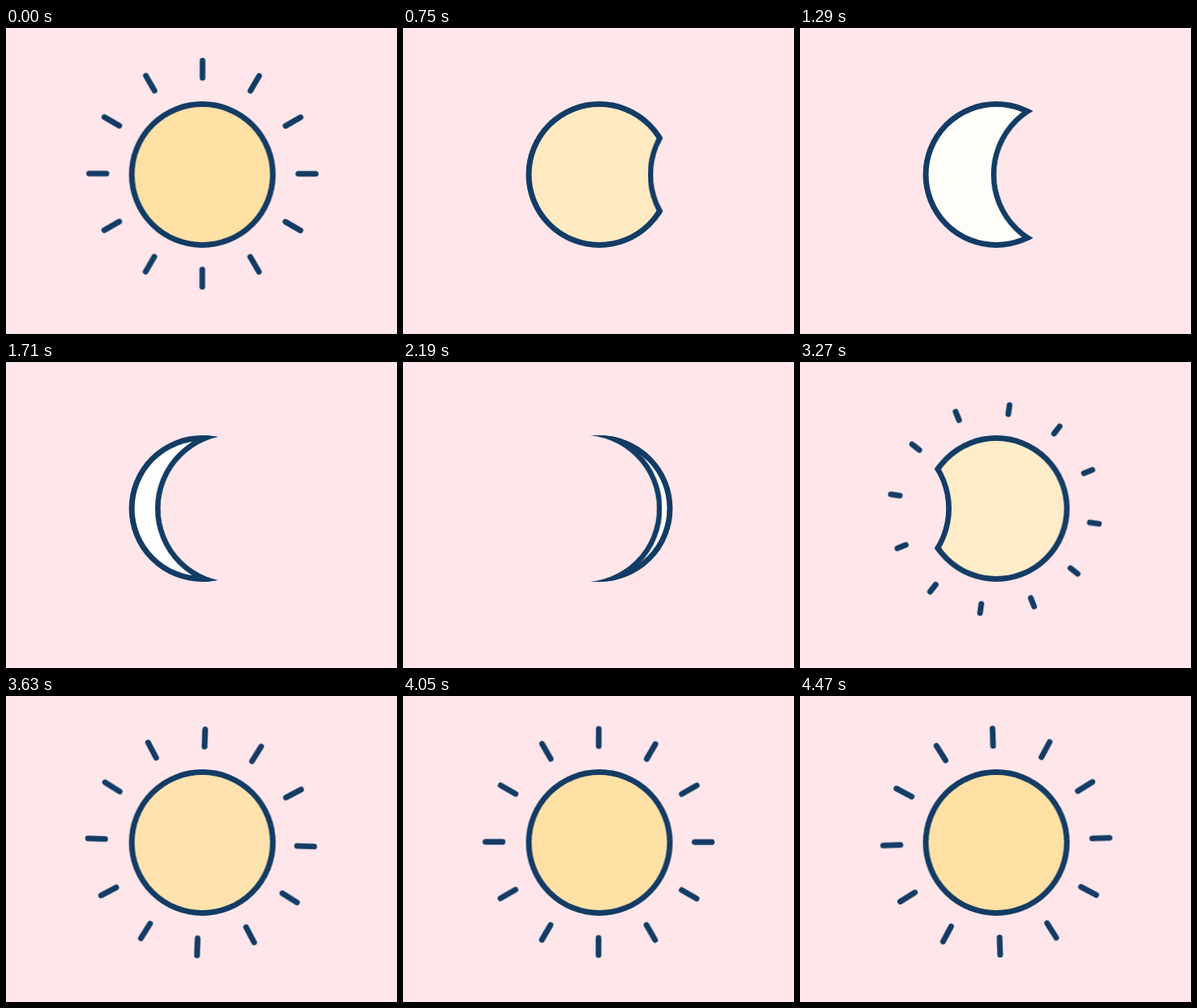
Animation, 485 px wide and 380 px high, one loop 4.5 s. Source, as an HTML page:

```html
<!DOCTYPE html>
<html lang="en">
<head>
<meta charset="utf-8">
<title>Sun and moon</title>
<style>
  :root { --sky: #ffe6ea; --ink: #133c65; --sun: #ffe0a5; --moon: #fff; }
  html, body { margin: 0; width: 100%; height: 100%; overflow: hidden; background: var(--sky); }
  svg { display: block; width: 100vw; height: 100vh; }
  .disc, .ring, .ray { stroke: var(--ink); stroke-width: 7; }
  .disc, .ring, .shade, .ray, .rays { animation: 4.5s linear infinite; }

  .disc { animation-name: tint; }
  .ring, .shade { animation-name: pass; }
  .ring { fill: none; }
  .shade { fill: var(--sky); }
  .rays { animation-name: spin; }
  .ray { stroke-linecap: round; stroke-dasharray: 21.5 60; animation-name: trim; }

  @keyframes pass {
    from { transform: translateX(251px); }
    to { transform: translateX(-305.6px); }
  }
  /* the angle jumps while the rays are hidden */
  @keyframes spin {
    0% { transform: rotate(0deg); }
    40% { transform: rotate(120deg); }
    40.001% { transform: rotate(-180deg); }
    100% { transform: rotate(0deg); }
  }
  @keyframes tint {
    0%, 33.333%, 56.667%, 100% { animation-timing-function: cubic-bezier(.333, 0, .667, 1); }
    0%, 6.667% { fill: var(--sun); animation-timing-function: cubic-bezier(.333, 0, .667, 1); }
    33.333%, 56.667% { fill: var(--moon); }
    83.333%, 100% { fill: var(--sun); }
  }
  @keyframes trim {
    0%, 6.667% { stroke-dashoffset: 0; visibility: visible; animation-timing-function: cubic-bezier(.333, 0, .667, 1); }
    16.667% { stroke-dashoffset: 21.5px; visibility: visible; }
    16.668%, 64% { stroke-dashoffset: 21.5px; visibility: hidden; }
    64.001% { stroke-dashoffset: 21.5px; visibility: visible; animation-timing-function: cubic-bezier(.333, 0, .667, 1); }
    80.667%, 100% { stroke-dashoffset: 0; visibility: visible; }
  }
</style>
</head>
<body>
<svg viewBox="0 0 485 380">
  <defs>
    <clipPath id="inside"><circle r="91"/></clipPath>
    <clipPath id="around"><circle r="92"/></clipPath>
  </defs>
  <g transform="translate(243.6 182.9)"><g class="rays" id="rays"></g></g>
  <g transform="translate(243.5 182)">
    <circle class="disc" r="87.5"/>
    <g clip-path="url(#inside)"><circle class="ring" r="94.5"/></g>
    <g clip-path="url(#around)"><circle class="shade" r="91.2"/></g>
  </g>
</svg>
<script>
  const rays = document.getElementById('rays');
  for (let i = 0; i < 12; i++) {
    const ray = document.createElementNS('http://www.w3.org/2000/svg', 'path');
    ray.setAttribute('class', 'ray');
    ray.setAttribute('d', 'M0-119V-140.5');
    ray.setAttribute('transform', `translate(0 -1.9) rotate(${i * 30})`);
    rays.append(ray);
  }
</script>
</body>
</html>
```
